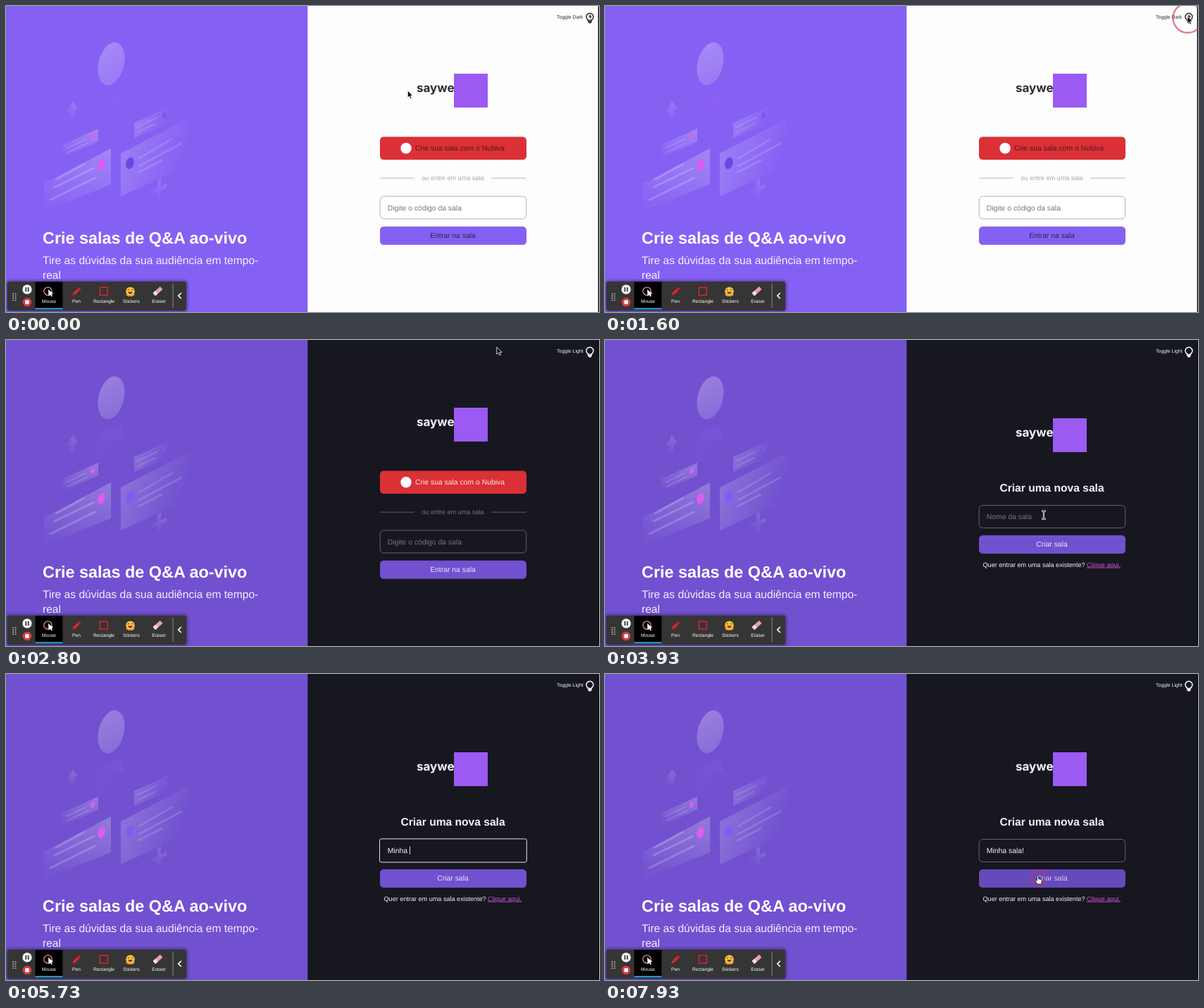
An HTML page that plays this animation: 842 px wide and 434 px high, repeating every 8000 ms.

```html
<!DOCTYPE html>
<html lang="pt-BR">
<head>
<meta charset="utf-8">
<title>Criar sala</title>
<style>
html, body { margin: 0; width: 100%; height: 100%; overflow: hidden; }
svg { display: block; width: 100%; height: 100%; }
text { font-family: "Liberation Sans", Arial, sans-serif; text-rendering: geometricPrecision; white-space: pre; }
#stage {
  --side: #8561f3; --bg: #fdfdfe; --ink: #2e2e36; --btn: #8561f3; --btnInk: #30254f;
  --redInk: #4a1c22; --line: #a9a9b0; --mute: #a6a6ae; --hint: #75757a; --dot: #6d48dc; --field: #fff;
}
#stage.dark {
  --side: #7151d0; --bg: #171720; --ink: #f4f4f8; --btn: #7151d0; --btnInk: #eae4fa;
  --redInk: #fbe9ea; --line: #6b6b74; --mute: #77777f; --hint: #76767e; --dot: #825bf7; --field: #171720;
}
.mid { text-anchor: middle; }
.t16 { font-size: 10.4px; }
.t14 { font-size: 9.1px; }
.t24 { font-size: 15.6px; }
.btn { fill: var(--btn); }
.ink { fill: var(--ink); }
.field { fill: var(--field); stroke: var(--line); stroke-width: .9; }
.field.focus { stroke: #e4e4e6; stroke-width: 1; }
.tool { font: 500 6.7px Roboto, sans-serif; fill: #fff; text-anchor: middle; }
.off { display: none; }
</style>
</head>
<body>
<svg id="stage" viewBox="0 0 842 434" preserveAspectRatio="none">
  <defs>
    <linearGradient id="egg" x1="0" y1="0" x2=".6" y2="1">
      <stop offset="0" stop-color="#fff" stop-opacity=".28"/><stop offset="1" stop-color="#fff" stop-opacity=".16"/>
    </linearGradient>
    <linearGradient id="cardL" x1=".85" y1="0" x2=".45" y2="1">
      <stop offset="0" stop-color="#fff" stop-opacity=".23"/><stop offset="1" stop-color="#fff" stop-opacity=".02"/>
    </linearGradient>
    <linearGradient id="cardR" x1=".05" y1=".3" x2=".85" y2=".65">
      <stop offset="0" stop-color="#fff" stop-opacity=".19"/><stop offset="1" stop-color="#fff" stop-opacity="0"/>
    </linearGradient>
    <linearGradient id="haze" x1="0" y1="1" x2="1" y2="0">
      <stop offset="0" stop-color="#9a50e8" stop-opacity="0"/><stop offset="1" stop-color="#a45cf0" stop-opacity=".22"/>
    </linearGradient>
    <filter id="soft" x="-20%" y="-40%" width="140%" height="180%"><feGaussianBlur stdDeviation="2"/></filter>
  </defs>

  <rect width="842" height="434" fill="var(--bg)"/>
  <rect width="428.300" height="434" fill="var(--side)"/>
  <rect x="840.700" width="1.300" height="434" fill="#0b0b10"/>

  <!-- illustration -->
  <g fill="none" stroke-linecap="round">
    <path d="M119 170Q123 128 163 122L168 138Q139 143 137 174Z" fill="url(#haze)"/>
    <ellipse cx="146" cy="79" rx="21" ry="36" transform="rotate(16 146 79)" fill="url(#haze)" opacity=".35"/>
    <ellipse cx="149.500" cy="82" rx="18" ry="31" transform="rotate(14 149.500 82)" fill="url(#egg)"/>
    <path d="M86 151L95 135L102 145L98 147L97 158L90 161L91 150Z" fill="url(#cardL)" opacity=".75"/>
    <path d="M80 197L131 174V192L80 216Z" fill="url(#cardL)"/>
    <path d="M149 202V253L54 291V252Z" fill="url(#cardL)"/>
    <path d="M182 166L232 143V166L182 187Z" fill="url(#cardR)"/>
    <path d="M163 209L259 160L255 228L163 270Z" fill="url(#cardR)"/>
    <path d="M215 247L220 244.500V256L228 252V258L220 262V270L215 273V264L206 268V262L215 258Z" fill="url(#cardL)" opacity=".65"/>
    <g stroke="#fff" stroke-opacity=".2" stroke-width="2.600">
      <path d="M71 246L111 224M69 257L125 230M63 275L126 244"/>
      <path d="M189 216L235 189M189 227L249 195M188 236L221 219" stroke-opacity=".14"/>
      <path d="M86 202L113 189M87 208L116 194M186 172L215 158M187 179L212 167" stroke-width="1.600" stroke-opacity=".16"/>
    </g>
    <g fill="#df5cf0">
      <ellipse cx="135.500" cy="225" rx="5" ry="8" transform="rotate(16 135.500 225)"/>
      <ellipse cx="123" cy="185.500" rx="2.700" ry="4.300" transform="rotate(16 123 185.500)"/>
    </g>
    <g fill="var(--dot)">
      <ellipse cx="176" cy="223" rx="5.500" ry="8.500" transform="rotate(16 176 223)"/>
      <ellipse cx="225" cy="155" rx="2.500" ry="4" transform="rotate(16 225 155)" opacity=".5"/>
    </g>
  </g>
  <g fill="#fff">
    <text x="52" y="336.500" font-size="23.4" font-weight="700">Crie salas de Q&amp;A ao-vivo</text>
    <g class="t24" fill="#f4effd"><text x="52" y="366">Tire as dúvidas da sua audiência em tempo-</text><text x="52" y="386.800">real</text></g>
  </g>

  <!-- theme switch -->
  <text id="mode" class="ink" x="782" y="18.300" font-size="7"></text>
  <g fill="none" stroke="var(--ink)" stroke-width="1.500">
    <path d="M826.500 20.500V19.500A5 5 0 1 1 831.500 19.500V20.500Z"/>
    <path d="M826.500 21.500H831.500V23L830 24.300H828L826.500 23Z" fill="var(--ink)" stroke-width=".6"/>
    <path id="bolt" d="M830 11.500L827 15.500H829V18.500L832 14.500H830Z" fill="var(--ink)" stroke="none"/>
  </g>

  <g id="brand">
    <text class="ink" x="583" y="121.500" style="font:700 17px Inter,sans-serif">saywe</text>
    <rect x="636" y="96" width="48" height="48" fill="#9b5af2"/>
  </g>

  <g id="home">
    <g id="login">
      <rect x="531" y="185.500" width="208" height="32.500" rx="5.200" fill="#db3036"/>
      <circle cx="568" cy="201.700" r="7.700" fill="#fff"/>
      <text class="t16" x="581" y="205.300" fill="var(--redInk)">Crie sua sala com o Nubiva</text>
    </g>
    <path d="M531 244.200H580M689 244.200H739" stroke="var(--line)" stroke-width=".8"/>
    <text class="t14 mid" x="634.500" y="247.300" fill="var(--mute)">ou entre em uma sala</text>
    <rect class="field" x="531.200" y="270" width="207.500" height="32" rx="5.200"/>
    <text class="t16" x="541.800" y="289.500" fill="var(--hint)">Digite o código da sala</text>
    <rect class="btn" x="531" y="312.700" width="208" height="26" rx="5.200"/>
    <text class="t16 mid" x="634.500" y="329.200" fill="var(--btnInk)">Entrar na sala</text>
  </g>

  <g id="room">
    <text class="t24 ink mid" x="634.500" y="214.800" font-weight="700">Criar uma nova sala</text>
    <rect id="idle" class="field" x="531.200" y="234.500" width="207.500" height="32" rx="5.200"/>
    <rect id="focus" class="field focus" x="530.500" y="233.800" width="208.800" height="33.200" rx="2.500"/>
    <text id="name" class="t16" x="541.800" y="253.800"></text>
    <rect id="caret" y="244.500" width=".8" height="11.500" fill="#fff"/>
    <g id="create">
      <rect class="btn" x="531" y="277" width="208" height="26" rx="5.200"/>
      <text class="t16 mid" x="634.500" y="293.300" fill="var(--btnInk)">Criar sala</text>
    </g>
    <text class="t14 ink" x="536.500" y="321.600">Quer entrar em uma sala existente? <tspan fill="#cf52d6" text-decoration="underline">Clique aqui.</tspan></text>
  </g>

  <!-- recorder bar -->
  <rect x="1" y="390" width="256" height="43" rx="4" fill="#1c1630" opacity=".65" filter="url(#soft)"/>
  <rect x="2" y="391" width="254" height="41" rx="3" fill="#353535"/>
  <rect x="41.500" y="391" width="39" height="39" fill="#000"/>
  <rect x="41.500" y="428.300" width="39" height="1.900" fill="#25a9df"/>
  <path d="M10.200 407.500V418M13.600 407.500V418" stroke="#c4c4c4" stroke-width="1.700" stroke-dasharray="1.500 1.500"/>
  <circle cx="30" cy="402" r="6.700" fill="#f3f3f3"/>
  <path d="M28.300 399V405M31.700 399V405" stroke="#333" stroke-width="1.700"/>
  <circle cx="30" cy="420" r="6.300" fill="#d93a41"/>
  <rect x="27.300" y="417.300" width="5.400" height="5.400" rx=".6" fill="#fff"/>
  <circle cx="59.500" cy="404.500" r="5.700" fill="none" stroke="#e8929a" stroke-width="1.200"/>
  <path d="M60 402L60.500 411.500L62.800 409.600L64.400 412.200L66 411.200L64.500 408.700L67.300 408Z" fill="#fff"/>
  <g transform="translate(100 405) rotate(45)"><path d="M-2-7H2V4L0 8L-2 4Z" fill="#d8262d"/><path d="M-2-4.500H2" stroke="#8e1218"/></g>
  <rect x="133.300" y="399.200" width="11" height="11" fill="none" stroke="#e2202a" stroke-width="1.500"/>
  <circle cx="176.500" cy="404.700" r="6.300" fill="#f7c443"/>
  <path d="M172.500 403Q173.800 401 175 403M178 403Q179.300 401 180.500 403" fill="none" stroke="#5a3412" stroke-width="1"/>
  <path d="M172.800 405.500H180.200Q176.500 411 172.800 405.500Z" fill="#7a2b1c"/>
  <path d="M171.500 409.500L175 411M181.500 409.500L178 411" stroke="#ee9a2c" stroke-width="2.200" stroke-linecap="round"/>
  <g transform="translate(215.500 404.500) rotate(-42)"><rect x="-7" y="-2.800" width="14" height="5.600" rx="1" fill="#e9a0ae"/><rect x="-7" y="-2.800" width="5" height="5.600" rx="1" fill="#f6dce0"/></g>
  <g class="tool"><text x="61" y="421.300">Mouse</text><text x="100" y="421.300">Pen</text><text x="139" y="421.300">Rectangle</text><text x="178" y="421.300">Stickers</text><text x="217" y="421.300">Eraser</text></g>
  <path d="M237 393.500V428" stroke="#8b8b8b" stroke-width="1"/>
  <path d="M248.800 407L244.800 411L248.800 415" fill="none" stroke="#fff" stroke-width="1.700"/>

  <circle id="ring" fill="none" stroke="#d3304a"/>
  <g id="mouse">
    <path id="arrow" d="M0 0V10.200L2.400 8.100L4 11.700L5.800 10.900L4.200 7.400H7.300Z" fill="#0c0c0e" stroke="#fff" stroke-width=".8"/>
    <g id="beam" fill="none"><path d="M-2.800-5.500H2.800M0-5.500V5.500M-2.800 5.500H2.800" stroke="#fff" stroke-width="2.200"/><path d="M-2.300-5.500H2.300M0-5.500V5.500M-2.300 5.500H2.300" stroke="#111" stroke-width=".7"/></g>
    <path id="hand" d="M-1 0Q0-1 1 0V4L5 5.200Q6 5.600 5.800 7L5 11.500H-.5L-3.500 7Q-3.600 5.400-1 6.600Z" fill="#fff" stroke="#111" stroke-width=".8"/>
  </g>
</svg>
<script>
const LOOP = 8000;
const DARK_AT = 1730, ROOM_AT = 3460, FOCUS_AT = 4310, BLUR_AT = 7800;
const HIDE = [5060, 7400];
const CLICKS = [1600, 3300, 4260, 7800];
const NAME = "Minha sala!";
const KEYS = [5060, 5130, 5200, 5260, 5530, 5730, 5800, 5860, 6060, 6130, 6600];
// time, x, y
const PATH = [
  [0, 570, 120], [300, 652, 82], [560, 765, 30], [740, 815, 11], [860, 822, 16],
  [930, 822, 16], [1260, 827, 14.5], [2460, 827, 14.5], [2800, 697, 9.5],
  [3030, 655, 110], [3270, 632, 199], [3500, 632, 199], [3930, 623, 248],
  [4060, 618, 254], [7330, 618, 254], [7660, 614.5, 286.5]
];
const $ = id => document.getElementById(id);
const show = (id, on) => $(id).classList.toggle("off", !on);
const clamp = v => Math.max(0, Math.min(1, v));

function pointer(t) {
  const i = PATH.findIndex(p => p[0] > t);
  if (i < 0) return PATH[PATH.length - 1].slice(1);
  const [a, ax, ay] = PATH[i - 1], [b, bx, by] = PATH[i];
  const u = (t - a) / (b - a);
  return [ax + (bx - ax) * u, ay + (by - ay) * u];
}

const dim = (id, t, from) => {
  $(id).style.filter = `brightness(${1 - 0.1 * clamp((t - from) / 200)})`;
};

function drawMouse(t, room) {
  const [x, y] = pointer(t);
  const inside = (top, bottom) => y > top && y < bottom;
  const hand = room ? inside(277, 303) : inside(185, 218);
  const beam = room && inside(234, 267);
  show("mouse", t < HIDE[0] || t >= HIDE[1]);
  show("hand", hand);
  show("beam", beam);
  show("arrow", !hand && !beam);
  $("mouse").setAttribute("transform", `translate(${x} ${y})`);

  const click = CLICKS.find(c => t >= c && t < c + 220);
  show("ring", click !== undefined);
  if (click === undefined) return;
  const u = clamp((t - click) / 140);
  const ring = { cx: x + 0.5, cy: y + 2.5, r: 21 - 11.5 * u, "stroke-width": 2.6 - 1.4 * u, opacity: 0.6 + 0.2 * u };
  for (const k in ring) $("ring").setAttribute(k, ring[k]);
}

function drawField(t) {
  const count = KEYS.filter(k => t >= k).length;
  const focused = t >= FOCUS_AT && t < BLUR_AT;
  const label = $("name");
  const text = count ? NAME.slice(0, count) : "Nome da sala";
  if (label.textContent !== text) label.textContent = text;
  label.setAttribute("fill", count ? "#f4f4f8" : "var(--hint)");
  show("focus", focused);
  show("idle", !focused);
  const since = t - (count ? KEYS[count - 1] : FOCUS_AT);
  show("caret", focused && Math.floor(since / 550) % 2 === 0);
  $("caret").setAttribute("x", 542 + (count ? label.getComputedTextLength() : 0));
}

function draw(t) {
  const dark = t >= DARK_AT, room = t >= ROOM_AT;
  $("stage").classList.toggle("dark", dark);
  $("mode").textContent = dark ? "Toggle Light" : "Toggle Dark";
  show("bolt", !dark);
  show("home", !room);
  show("room", room);
  $("brand").setAttribute("transform", `translate(0 ${room ? 15 : 0})`);
  dim("login", t, 3230);
  dim("create", t, 7600);
  if (room) drawField(t);
  drawMouse(t, room);
}

const start = performance.now();
function tick() {
  draw((performance.now() - start) % LOOP);
  requestAnimationFrame(tick);
}
tick();
</script>
</body>
</html>
```
